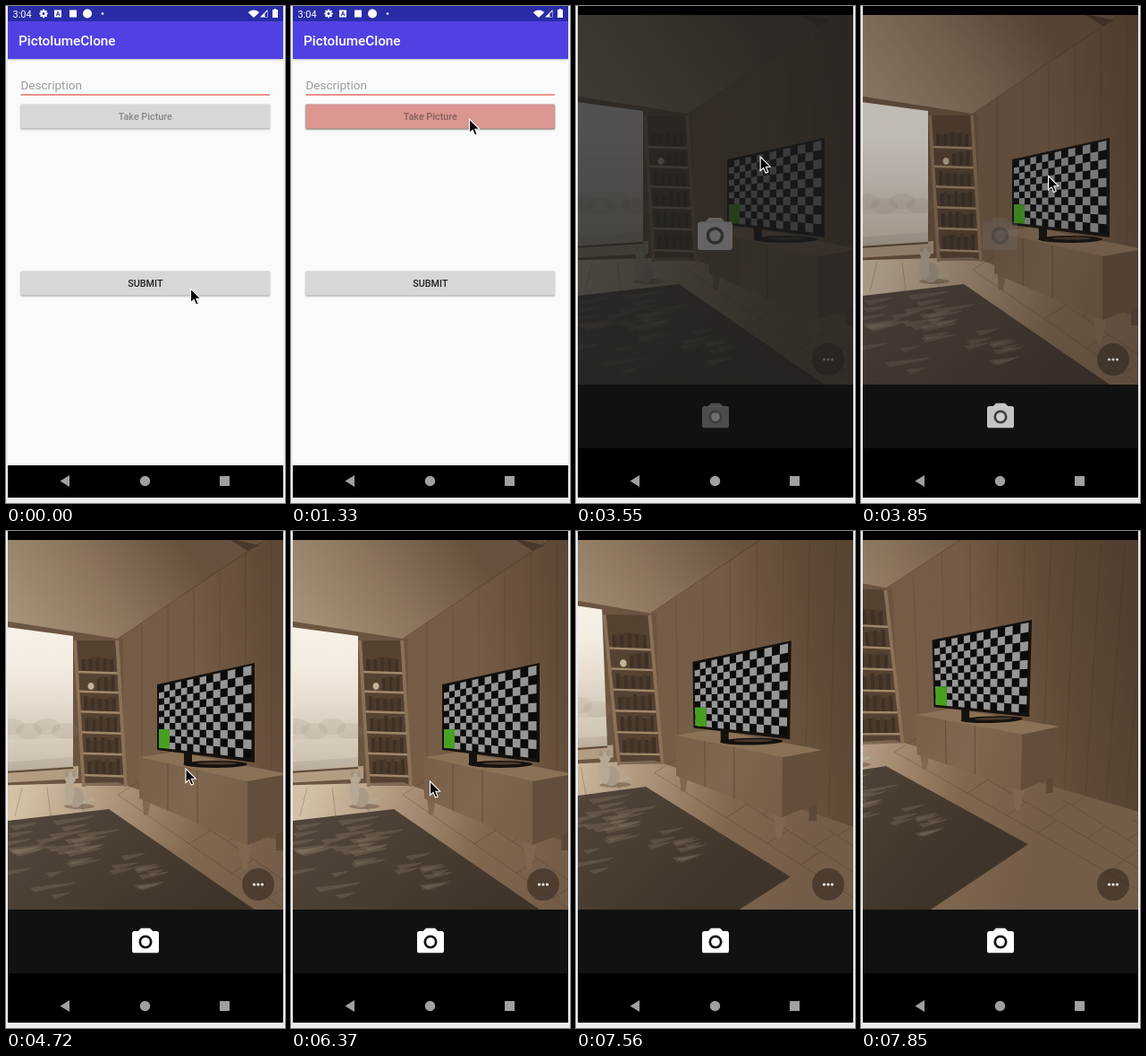
An HTML page with a canvas for the animation above (8000 ms loop, 312 by 554 pixels).

```html
<!DOCTYPE html>
<html lang="en">
<head>
<meta charset="utf-8">
<title>Camera demo</title>
<style>
html, body { margin: 0; width: 100%; height: 100%; overflow: hidden; background: #ececec; }
canvas { display: block; width: 312px; height: 554px; }
</style>
</head>
<body>
<canvas id="stage"></canvas>
<script>
const LOOP = 8000, W = 312, H = 554;
const canvas = document.getElementById('stage');
const ratio = window.devicePixelRatio || 1;
canvas.width = W * ratio;
canvas.height = H * ratio;
const c = canvas.getContext('2d');

const lerp = (a, b, p) => a + (b - a) * p;
const ramp = (t, from, to) => Math.min(1, Math.max(0, (t - from) / (to - from)));
const overshoot = (p, s = 3) => 1 + (s + 1) * (p - 1) ** 3 + s * (p - 1) ** 2;
const range = n => Array.from({ length: n }, (_, i) => i);
function seeded(seed) {
  return () => (seed = seed * 16807 % 2147483647) / 2147483647;
}

function rect(x, y, w, h, color) {
  c.fillStyle = color;
  c.fillRect(x, y, w, h);
}
function round(x, y, w, h, r, color) {
  c.fillStyle = color;
  c.beginPath();
  c.roundRect(x, y, w, h, r);
  c.fill();
}
function disc(x, y, r, color) {
  c.fillStyle = color;
  c.beginPath();
  c.arc(x, y, r, 0, 7);
  c.fill();
}
function shape(points, color) {
  c.beginPath();
  points.forEach(p => c.lineTo(p[0], p[1]));
  c.closePath();
  c.fillStyle = color;
  c.fill();
}
function label(text, x, y, size, color, weight = 400, align = 'left') {
  c.font = `${weight} ${size}px Roboto, sans-serif`;
  c.textAlign = align;
  c.fillStyle = color;
  c.fillText(text, x, y);
}
function zoomed(scale, draw) {
  c.save();
  c.translate(156, 280);
  c.scale(scale, scale);
  c.translate(-156, -280);
  draw();
  c.restore();
}
function shadowed(alpha, draw) {
  c.save();
  c.shadowColor = `rgba(0,0,0,${alpha})`;
  c.shadowBlur = 2 * ratio;
  c.shadowOffsetY = ratio;
  draw();
  c.restore();
}

// ---- Phone interface ----
function statusIcons() {
  const white = '#fff', y = 8.5;
  label('3:04', 7.5, 12.5, 11, white);
  for (const i of range(8))
    disc(42 + 3.8 * Math.cos(i * Math.PI / 4), y + 3.8 * Math.sin(i * Math.PI / 4), 1.1, white);
  disc(42, y, 3.6, white);
  disc(42, y, 1.5, '#2a2ba7');
  rect(54, 4.5, 8, 8, white);
  label('A', 58, 11, 7, '#2a2ba7', 700, 'center');
  rect(71, 4.5, 8, 8, white);
  disc(91, y, 5, white);
  disc(108, y, 1.3, white);
  c.beginPath();
  c.moveTo(277, 13);
  c.arc(277, 13, 8.5, -Math.PI * .76, -Math.PI * .24);
  c.fill();
  shape([[284, 12.5], [292.5, 12.5], [292.5, 4]], white);
  shape([[289.5, 12], [292, 12], [292, 6], [289.5, 8.5]], '#2a2ba7');
  rect(298, 4, 6, 9, white);
  rect(300, 3, 2, 1, white);
}

function button(text, y, fill, textColor) {
  shadowed(.35, () => round(16.5, y, 278.5, 27, 1, fill));
  label(text, 155.8, y + 17.8, 10.8, textColor, 500, 'center');
}

function home(press) {
  rect(2, 0, 308, 512, '#fafafa');
  shadowed(.25, () => rect(2, 17, 308, 42, '#5141e2'));
  rect(2, 0, 308, 17, '#2a2ba7');
  label('PictolumeClone', 14, 44.3, 15.3, '#fff', 500);
  label('Description', 16.5, 93.2, 13.5, '#9b9b9b');
  rect(16.5, 98.3, 278.5, 1.4, '#e06a60');
  button('Take Picture', 109.5, '#d6d7d7', '#858686');
  c.globalAlpha = press;
  button('Take Picture', 109.5, '#db9690', '#84605d');
  c.globalAlpha = 1;
  button('SUBMIT', 295.5, '#d6d7d7', '#202020');
}

function navIcons() {
  const gray = '#a0a0a0';
  shape([[60.5, 529.5], [71, 523], [71, 536]], gray);
  disc(155.5, 529.5, 5.7, gray);
  rect(239, 524, 11, 11, gray);
}

function cameraIcon(x, y, width, color, hole) {
  c.save();
  c.translate(x, y);
  c.scale(width / 39, width / 39);
  round(-19.5, -13.5, 39, 31.5, 3.5, color);
  shape([[-11, -13.4], [-6.5, -18], [6.5, -18], [11, -13.4]], color);
  disc(0, 2, 9.8, hole);
  disc(0, 2, 6.3, color);
  c.restore();
}

function cursor(x, y) {
  c.save();
  c.translate(x, y);
  shape([[0, 0], [0, 15.5], [3.6, 12.3], [6, 18], [8.7, 16.9], [6.3, 11.3], [11.2, 11]], '#000');
  c.strokeStyle = '#fff';
  c.lineWidth = 1.1;
  c.stroke();
  c.restore();
}

// ---- Room seen by the camera; pan and tilt run from 0 to 1 ----
let pan = 0, tilt = 0;

function project([x, y]) {
  const dx = x - 223, dy = y - 204, depth = 1 + .0005 * (pan * dx + tilt * dy);
  return [223 - 87 * pan + dx / depth, 204 - 48 * tilt + dy / depth];
}
const poly = (points, color) => shape(points.map(project), color);

// An upright face between two vertical edges.
function panel(x0, top0, bottom0, x1, top1, bottom1, color) {
  poly([[x0, top0], [x1, top1], [x1, bottom1], [x0, bottom0]], color);
}
function seam(a, b, color, width = 1) {
  c.strokeStyle = color;
  c.lineWidth = width;
  c.beginPath();
  c.moveTo(...project(a));
  c.lineTo(...project(b));
  c.stroke();
}
function shade(from, to, ...colors) {
  const g = c.createLinearGradient(...project(from), ...project(to));
  colors.forEach((color, i) => g.addColorStop(i / (colors.length - 1), color));
  return g;
}
function blob(x, y, rx, ry, color) {
  poly(range(24).map(i => [x + rx * Math.cos(i * Math.PI / 12), y + ry * Math.sin(i * Math.PI / 12)]), color);
}

// Edges of the right wall, which starts at the corner x = 125.
const FAR = 560, CORNER = 125;
const ceilingEdge = x => 120 - (x - CORNER) * .67;
const floorEdge = x => 280 + (x - CORNER) * .365;

function walls() {
  panel(CORNER, ceilingEdge(CORNER), 290, FAR, ceilingEdge(FAR), floorEdge(FAR),
    shade([CORNER, 200], [400, 150], '#765d46', '#755c46', '#614b38', '#513f2f'));
  panel(-60, 90, 298, CORNER + 6, 120, 285, '#6c5540');
  poly([[-80, 88], [CORNER, 120], [420, ceilingEdge(420)], [-80, -80]],
    shade([20, 108], [180, -10], '#a59078', '#8c755d', '#66513e'));
  for (let x = 152; x < 500; x += 29)
    seam([x, ceilingEdge(x)], [x, floorEdge(x)], 'rgba(50,34,22,.16)');
  poly([[248, 8], [270, 22], [284, 16]], '#49382a');
}

function floor() {
  poly([[-60, 285], [CORNER, 280], [FAR, floorEdge(FAR)], [FAR, 760], [-60, 760]],
    shade([20, 290], [300, 400], '#d3c1a6', '#ac947a', '#80684f', '#745d48'));
  const random = seeded(11), line = 'rgba(60,44,31,.28)', spacing = 100;
  for (const i of range(5)) {
    const x = CORNER + i * spacing, y = floorEdge(x) + 14;
    seam([x, y], [x + 350, y + 240], line);
    for (const j of range(5)) {
      const step = (j + random()) * 55, d = spacing * .246;
      seam([x + step, y + step * .69], [x + step + d, y + step * .69 - d * .63], line);
    }
  }
  for (const i of range(4))
    seam([i * 28 - 10, 286], [i * 40 - 30, 318], 'rgba(90,70,50,.3)');
}

function windowPane() {
  const edge = 75;
  panel(-60, 99, 273, edge, 117, 264,
    shade([30, 110], [30, 270], '#f6f0e6', '#f3ece1', '#e6dccf', '#d2c7b9', '#b8ab9b'));
  for (const i of range(4))
    blob(6 + i * 20, 218 + i % 2 * 5, 15, 9, 'rgba(148,132,116,.15)');
  panel(-60, 234, 262, edge, 231, 252, 'rgba(226,215,198,.4)');
  panel(-60, 271, 284, edge + 6, 262, 276, '#b39d82');
  seam([-60, 273], [edge, 264], '#5d4937', 2);
}

function carpet() {
  poly([[-60, 330], [115, 310], [281, 424], [158, 501], [-60, 640]],
    shade([40, 320], [160, 470], '#51443a', '#493d32', '#40342a'));
  const random = seeded(5);
  for (const i of range(34)) {
    const y = 323 + 90 * random(), reach = 110 + (y - 323) * 1.2;
    const x = reach * random() - 20, length = 20 + 35 * random();
    const right = Math.min(x + length, reach), drop = (right - x) * .12;
    poly([[x, y], [right, y - drop], [right - 6, y + 3 - drop], [x + 5, y + 5]], 'rgba(165,146,124,.22)');
  }
}

function bookshelf() {
  const left = y => 77 + (y - 120) * .06, right = y => 124 + (y - 120) * .06;
  poly([[left(122), 122], [right(122), 122], [right(284), 284], [left(284), 284]], 'rgba(60,44,32,.45)');
  const random = seeded(3);
  for (const row of range(6)) {
    const y = 157 + row * 21.5 + row * row * .3;
    const books = row === 1 ? 5 : 9;
    for (const i of range(books)) {
      const x = right(y) - 6 - i * 4, h = 14 + 4 * random();
      panel(x - 3.8, y - h, y, x, y - h, y, i % 2 ? '#4a3a2c' : '#3f3126');
    }
    seam([left(y), y], [right(y), y + 1.5], '#a0886b', 2.4);
  }
  blob(95, 173, 3.5, 4, '#c3b39b');
  for (const side of [left, right])
    seam([side(122), 122], [side(285), 285], '#8a7157', 3.8);
}

function pet() {
  const fur = '#b5a894';
  blob(82, 307, 17, 3, 'rgba(60,45,32,.35)');
  seam([84, 303], [98, 299], fur, 3);
  blob(78, 297, 9, 11, '#a89a86');
  blob(71, 291, 5.5, 15, fur);
  blob(72, 276, 6, 6, fur);
  for (const x of [68, 76]) blob(x, 271, 2, 4, '#a39481');
}

function cabinet() {
  const left = 149, front = 270, back = 316;
  const top = x => 252 + (x - left) * .223, bottom = x => 298 + (x - left) * .43;
  const leg = (x, length, width) =>
    poly([[x - width, bottom(x) - 4], [x + width, bottom(x)], [x + 2, bottom(x) + length], [x - 3, bottom(x) + length]], '#806750');
  leg(157, 15, 4.5);
  leg(267, 28, 8);
  panel(back - 14, 330, 356, back - 5, 330, 356, '#5c4836');
  panel(left, top(left), bottom(left), front, top(front), bottom(front),
    shade([left, 260], [front, 320], '#786049', '#80674f', '#775f48'));
  panel(front, top(front), bottom(front), back, 271, 333, '#634e3b');
  poly([[left, top(left)], [190, 246], [back, 271], [front, top(front)]], '#8b7156');
  for (const x of [181, 214]) seam([x, top(x)], [x, bottom(x)], '#634e3b');
}

function television() {
  const dark = '#15110e';
  const cols = 14, rows = 10, foreshorten = 1.27;
  blob(234, 260, 36, 4, dark);
  blob(236, 259, 22, 1.5, '#4a3a2c');
  panel(199, 244, 259, 208, 246, 259, dark);
  panel(169, 171, 244, 278, 147, 258, dark);
  const at = (i, j) => {
    const u = i / cols, s = u / (u + (1 - u) * foreshorten);
    return [171 + 103.5 * s, lerp(173.5 - 23.5 * s, 241.5 + 12 * s, j / rows)];
  };
  const cells = (i, j, w, h, color) => poly([at(i, j), at(i + w, j), at(i + w, j + h), at(i, j + h)], color);
  cells(0, 0, cols, rows, '#0b0b0b');
  for (const i of range(cols))
    for (const j of range(rows))
      if ((i + j) % 2) cells(i, j, 1, 1, '#969696');
  cells(0, rows - 3, 2, 3, '#48a022');
}

function cameraScreen(t) {
  const cover = 1 - ramp(t, 3400, 4000);
  pan = ramp(t, 6500, 7850) ** 3.5;
  tilt = ramp(t, 7260, 7850);
  rect(2, 0, 308, 548, '#000');
  c.save();
  c.beginPath();
  c.rect(2, 10, 308, 412);
  c.clip();
  [walls, floor, windowPane, bookshelf, carpet, pet, cabinet, television].forEach(draw => draw());
  disc(282, 394, 18, 'rgba(52,41,32,.6)');
  for (const i of range(3)) disc(277.5 + i * 4.5, 394, 1.6, '#fff');
  c.globalAlpha = cover;
  rect(2, 10, 308, 412, '#1c1c1c');
  cameraIcon(155.5, 254, 39, '#77767a', '#1c1c1c');
  c.restore();
  rect(2, 422, 308, 71, '#111');
  c.globalAlpha = 1 - cover;
  cameraIcon(156, 456.5, 30, '#fff', '#111');
  c.globalAlpha = 1;
}

function openingScreen(t) {
  const p = ramp(t, 2220, 2510);
  zoomed(lerp(1.036, 1.06, p), () => home(0));
  rect(2, 17, 308, 503, 'rgba(0,0,0,.05)');
  zoomed(lerp(.97, 1, p), () => {
    rect(2, 0, 308, 548, '#000');
    rect(2, 0, 308, 512, '#1c1c1c');
    cameraIcon(155.5, 254, 40, '#68686b', '#1c1c1c');
  });
}

function pointer(t) {
  if (t >= 6517) return;
  if (t >= 6370) return cursor(155.5, 279);
  const toButton = ramp(t, 300, 1330), toScreen = ramp(t, 2960, 3850), away = ramp(t, 4000, 4720);
  cursor(
    206.5 - 7 * toButton + 10 * toScreen - 8.5 * away,
    315 - 189 * overshoot(toButton) + 63.5 * toScreen + 75.5 * away
  );
}

function draw(t) {
  c.setTransform(ratio, 0, 0, ratio, 0, 0);
  rect(0, 0, W, H, '#ececec');
  c.save();
  c.beginPath();
  c.rect(2, 0, 308, 548);
  c.clip();
  rect(2, 0, 308, 548, '#000');
  if (t < 2220) home(ramp(t, 1180, 1330) - ramp(t, 1330, 1620));
  else if (t < 2510) openingScreen(t);
  else cameraScreen(t);
  if (t < 2510) statusIcons();
  navIcons();
  c.restore();
  pointer(t);
}

const start = performance.now();
function tick() {
  draw((performance.now() - start) % LOOP);
  requestAnimationFrame(tick);
}
tick();
</script>
</body>
</html>
```
